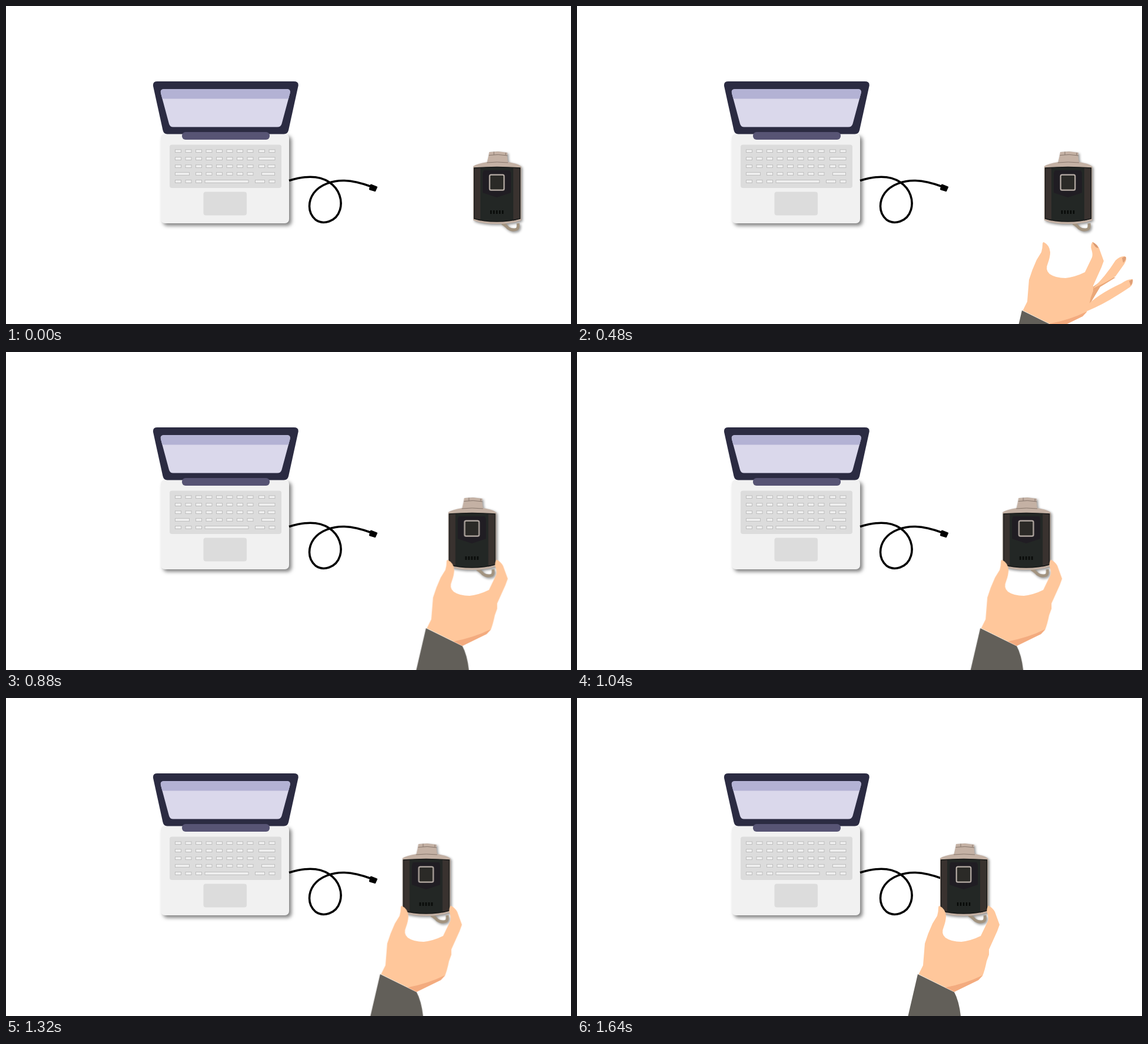
An HTML page for the animation above (2000 ms loop, 960x540 px).

```html
<!DOCTYPE html>
<html lang="en">
<head>
<meta charset="utf-8">
<title>Plugging in a device</title>
<style>
  html, body { margin: 0; width: 100%; height: 100%; overflow: hidden; background: #fff; }
  svg { display: block; width: 100vw; height: 100vh; }
  .base { filter: drop-shadow(4px 4px 3px rgba(0, 0, 0, .5)); }
  .device { filter: drop-shadow(2.5px 2.5px 2px rgba(0, 0, 0, .45)); }
  .key { fill: #f1f1f1; stroke: #bdbdbd; stroke-width: 1; }
  .slide { animation: slide 2s infinite; }
  .rise { animation: rise 2s infinite; }
  .open { animation: grip 2s step-end infinite; }

  /* Motion advances once every 40 ms. */
  @keyframes rise {
    0% { transform: translateY(192px); animation-timing-function: steps(16, end); }
    32%, 100% { transform: none; }
  }
  @keyframes slide {
    0%, 32% { transform: translateX(0); animation-timing-function: steps(25, end); }
    82%, 100% { transform: translateX(-177px); }
  }
  @keyframes grip {
    0% { visibility: visible; }
    32%, 100% { visibility: hidden; }
  }
</style>
</head>
<body>
<svg viewBox="0 0 960 540">
  <g id="laptop">
    <rect class="base" x="263" y="217" width="218" height="152" rx="7" fill="#f1f1f1"/>
    <path fill="#2b2b42" d="M257 128H489Q498 128 496.500 136L480 211Q478.500 217.500 472 217.500H274Q268 217.500 266.500 211L250 136Q249 128 257 128Z"/>
    <path fill="#dad8eb" d="M269 141H477Q484 141 482.500 148L468.500 200Q467 205.500 461 205.500H284Q278.500 205.500 277 200L263 148Q261.500 141 269 141Z"/>
    <path fill="#b3b2d4" d="M269 141H477Q484 141 482.500 148L480 157.500H265.500L263 148Q261.500 141 269 141Z"/>
    <rect x="299" y="214" width="149" height="13" rx="6" fill="#575474"/>
    <rect x="278" y="235.500" width="190" height="73.500" rx="4" fill="#dcdcdc"/>
    <rect x="335.500" y="315.500" width="73.500" height="40" rx="4" fill="#dcdcdc"/>
    <g id="keys"></g>
  </g>

  <g id="cable">
    <path fill="none" stroke="#000" stroke-width="3.600" d="M481 296.500C505 289 531 287 549 299C567 311 572 331 567.500 346C561 367 539 372 526 363C511 350 514 330 523 317.500C534 303 555 296 575 296.500C592 297 605 301 620 306.500"/>
    <path d="M620.500 302.500L630.500 306.500Q631.500 307 631 308L628 314.500Q627.500 315.500 626.500 315L618 312.500Q616.500 312 617 310.500L619 303.500Q619.500 302 620.500 302.500Z"/>
  </g>

  <g class="slide">
    <g class="device">
      <path fill="none" stroke="#a2937f" stroke-width="5" d="M843 369Q850 373 853 377Q860 382 868 379Q871 377 870 369"/>
      <path fill="#c4b1a4" d="M821 248L836 247L852 249L851.500 254L853 265Q872 268 875.500 273V364Q860 370 834 370Q809 370 794 364V272Q800 268 817.500 265L820 254Z"/>
      <path fill="none" stroke="#87776d" d="M820.500 253.500Q836 251 852 254M829 247.500V253M849 249V253.500M817 266Q834 264 853 266"/>
      <path fill="#232725" d="M795 275Q834 272 874 275V361Q856 366 834 366Q811 366 795 361Z"/>
      <path fill="#39322f" d="M795 275L806 274V364.500L795 361ZM874 275L862 274V364.500L874 361Z"/>
      <path fill="none" stroke="#171918" stroke-width="1.500" d="M795.500 275Q834 272 873.500 275V361Q856 366 834 366Q811 366 795.500 361Z"/>
      <path fill="#201d23" d="M812 279H856L858 284V317L834 325L810 317V284Z"/>
      <rect x="821.700" y="286.700" width="24.600" height="26" rx="2.500" fill="#2b2a27" stroke="#b7ada6" stroke-width="2.200"/>
      <path stroke="#070907" stroke-width="2.400" d="M824 347V353M829 347V353M834 347V353M839 347V353M844 347V353"/>
    </g>

    <g class="rise">
      <g class="open">
        <path fill="#eba879" d="M871 433L899 413L915 413L889 429L866 467Z"/>
        <path fill="#ffc79b" d="M876 432Q898 411 915 384Q923 376 931 377Q936 380 930 390L915 411Q900 421 882 429Z"/>
        <path fill="#ffc79b" d="M864 463Q884 442 925 423Q936 415 944 416Q946 423 940 429Q925 439 915 445Q895 458 867 470Z"/>
        <path fill="#dfa078" d="M926 380Q931 376 933 379Q932 385 928 388ZM938 419L944 416Q945 421 941 427Z"/>
      </g>
      <path fill="#625f59" d="M756 469L818 499.500Q826 514 829 540H739.500Z"/>
      <path fill="#ffc79b" d="M793 353Q803 358 804 370Q804 378 800 389Q795 400 803 407Q813 414 830 414Q847 412 863 404L875 379Q877 374 874 365Q872 358 876 352.500Q884 357 887 363L895 385L891 396L877 427L877 436L873 447Q870 462 866 472L859 479L818 499L757.500 469L765 454L768 417Q773 400 781 383L789 370Q791 363 791 357Q791 353 793 353Z"/>
      <path fill="#f3ab7f" d="M866 471L859 479L818 499L803 491.500Q837 485 866 471Z"/>
      <path class="open" fill="#d99a72" d="M876 353Q884 357 886 363Q880 363 876 353Z"/>
    </g>
  </g>
</svg>

<script>
  const keys = document.getElementById('keys');
  const columns = [287.5, 305, 322.5, 340, 357.5, 375, 392.5, 410];

  function addKey(row, x, width = 10) {
    const key = document.createElementNS('http://www.w3.org/2000/svg', 'rect');
    const box = { x, y: 244 + row * 12.9, width, height: 4.6 };
    for (const name in box) key.setAttribute(name, box[name]);
    key.setAttribute('class', 'key');
    keys.append(key);
  }

  [0, 1, 2].forEach(row => columns.forEach(x => addKey(row, x)));
  columns.slice(2).forEach(x => addKey(3, x));
  columns.slice(0, 3).forEach(x => addKey(4, x));

  // Right-hand and wide keys: row, x, width
  [
    [0, 429.5], [0, 447], [1, 429.5, 27.5], [2, 429.5], [2, 445, 12],
    [3, 287.5, 24], [3, 434.5, 22], [4, 338, 74], [4, 423.5, 16], [4, 447]
  ].forEach(args => addKey(...args));
</script>
</body>
</html>
```
